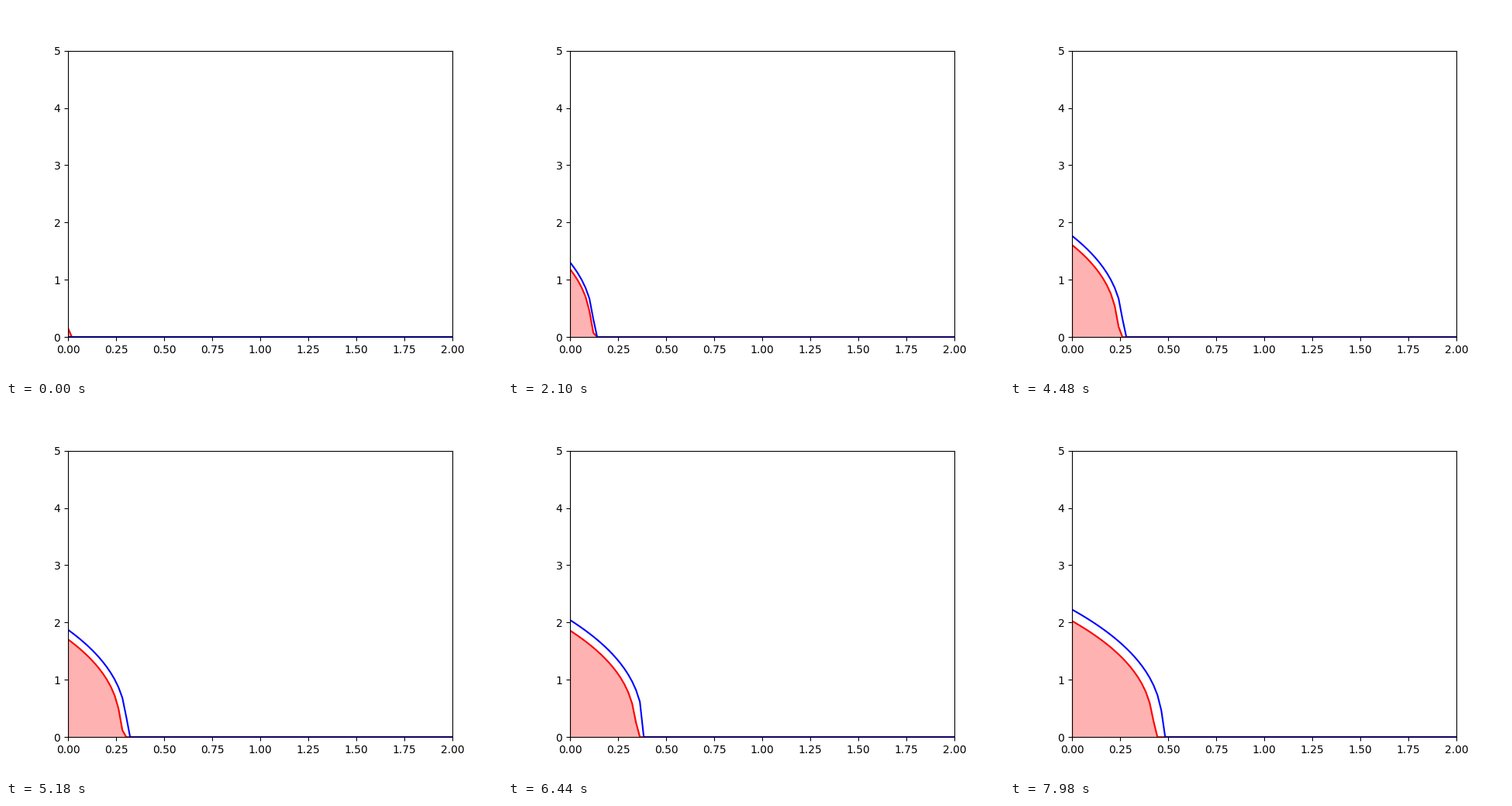
A matplotlib script that plays this animation: 640 by 480 pixels, repeating every 8 s.

```python
import numpy as np
import matplotlib.pyplot as plt
from matplotlib.animation import FuncAnimation

LOOP, TICK, STEP = 8000, 20, 140   # ms: whole loop, drawing tick, one time step

x = np.linspace(0, 2, 100)
dx = x[1]

# Smeared foot of the discrete front: distance behind it (in cells), height
FOOT_D = [-0.75, -0.5, -0.2, 0.0, 0.5]
FOOT_T = [0.0, 0.075, 0.185, 0.28, 0.455]


def wave(slope, front):
    """Travelling heat wave with conductivity ~ T^(5/2)."""
    return np.maximum(slope * (front - x), 0) ** 0.4


def exact(n):
    return wave(15.6, 0.00832 * n)


def discrete(n):
    front = 0.00744 * n - 0.28 * dx * np.exp(-n / 6)
    d = (front - x) / dx
    return np.where(d > 0.5, wave(13.8, front), np.interp(d, FOOT_D, FOOT_T))


fig, ax = plt.subplots(figsize=(6.4, 4.8), dpi=100)
ax.set_xlim(0, 2)
ax.set_ylim(0, 5)
red, = ax.plot(x, 0 * x, "r", lw=1.5)
blue, = ax.plot(x, 0 * x, "b", lw=1.5)
fill = None


def update(i):
    global fill
    n = i * TICK // STEP
    heat = discrete(n)
    red.set_ydata(heat)
    blue.set_ydata(exact(n))
    if fill is not None:
        fill.remove()
    fill = ax.fill_between(x, 0, heat, color="r", alpha=0.3)
    return red, blue, fill


anim = FuncAnimation(fig, update, frames=LOOP // TICK, interval=TICK,
                     init_func=lambda: update(0), repeat=True, repeat_delay=0)
plt.show()
```
